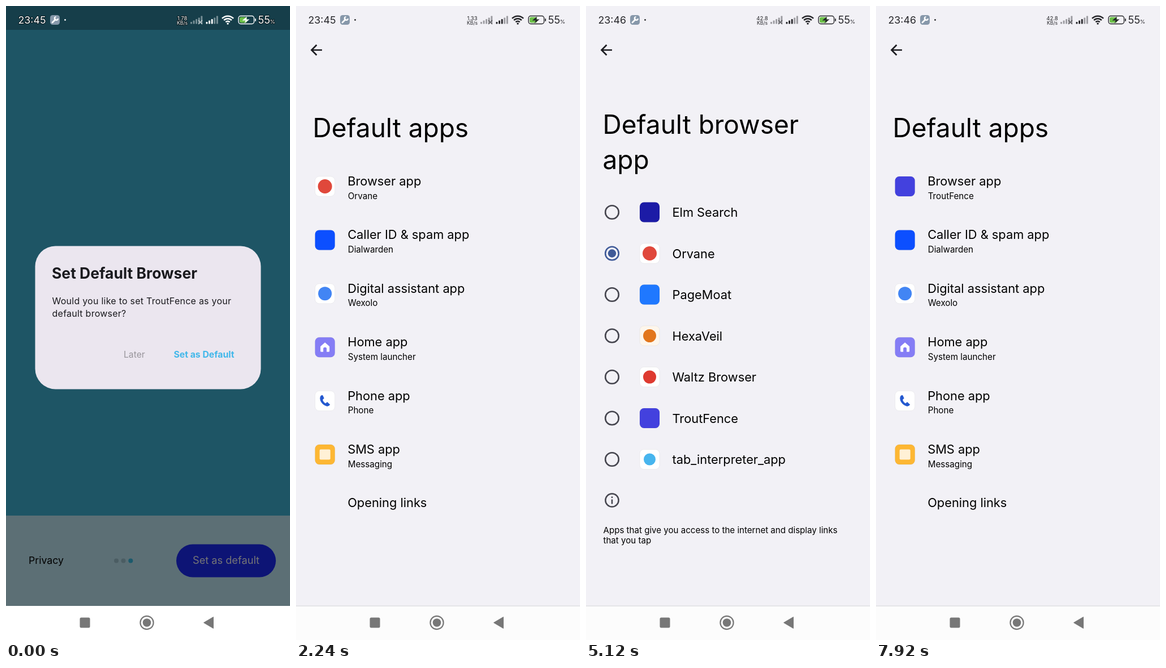
Write an HTML page that moves like this. It is 502 px wide and 1116 px high and loops after 8000 ms.

```html
<!DOCTYPE html>
<html lang="en">
<head>
<meta charset="utf-8">
<title>Default browser setup</title>
<style>
  html, body { margin: 0; width: 100%; height: 100%; overflow: hidden; background: #000; }
  svg { display: block; width: 100%; height: 100%; font-family: Inter, Roboto, sans-serif; font-optical-sizing: none; }
  text { white-space: pre; }
</style>
</head>
<body>
<svg id="stage" viewBox="0 0 502 1116"></svg>
<script>
const LOOP = 8000, W = 502, H = 1116;
const APP = 'TroutFence';
const PAPER = '#f2f1f6';

const txt = (x, y, size, str, attrs = '') =>
  `<text x="${x}" y="${y}" font-size="${size}" ${attrs}>${str}</text>`;
const rect = (x, y, w, h, fill, attrs = '') =>
  `<rect x="${x}" y="${y}" width="${w}" height="${h}" fill="${fill}" ${attrs}/>`;
const dot = (x, y, r, fill, attrs = '') =>
  `<circle cx="${x}" cy="${y}" r="${r}" fill="${fill}" ${attrs}/>`;

// App tile centred on x, y; inner is drawn around the tile's centre.
const tile = (x, y, fill, inner = '') =>
  `<g transform="translate(${x} ${y})">` +
  rect(-17.5, -17.5, 35, 35, fill, 'rx="7.5" stroke="#000" stroke-opacity=".05"') + inner + '</g>';

const house = '<path d="M0-8.5 8-1.5V6.5Q8 8 6.5 8H3V2.5Q3 0 0 0T-3 2.5V8H-6.5Q-8 8-8 6.5V-1.5Z" fill="#fff"/>';
const handset = '<path d="M-7-9.5Q-10-6-8 0-5 7 3 9.5 7 10 9 6.5L4 2 1 4.5Q-3 2-4-2L-1.5-4.5-4-10Z" fill="#2459cf"/>';
const icons = {
  chosen: ['#4341de'],
  ball: ['#fff', dot(0, 0, 12.5, '#e0483b')],
  caller: ['#0c4fff'],
  assist: ['#fff', dot(0, 0, 12, '#4285f4')],
  home: ['#857df5', house],
  phone: ['#fff', handset],
  sms: ['#fdb733', rect(-9.5, -9, 19, 18, '#fff', 'rx="2" opacity=".8"')],
  navy: ['#1c1ba6'],
  shield: ['#1f78ff'],
  wallet: ['#fdf6ec', dot(0, 0, 11.5, '#e2761b')],
  red: ['#fff', dot(0, 0, 11.5, '#de3a30')],
  sky: ['#fff', dot(0, 0, 10.5, '#47b5ee')]
};
const icon = (x, y, name) => tile(x, y, ...icons[name]);

const arrow = '<path d="M46 77.5H28M36.500 68.500 27.500 77.500 36.500 86.500" fill="none" stroke="#1c1c20" stroke-width="2.700"/>';

function setupPage() {
  return rect(0, 0, W, H, '#fff') +
    rect(0, 0, W, 1056, '#41b9de') +
    rect(0, 897, W, 159, '#c9f2ff') +
    txt(40, 982, 17.7, 'Privacy') +
    dot(195, 976.5, 4, '#a5cbd8') + dot(207.5, 976.5, 4, '#a5cbd8') + dot(220.3, 976.5, 4, '#3cc5ec') +
    rect(301, 947.5, 176, 58, '#1d2bff', 'rx="29"') +
    txt(389, 982, 18.2, 'Set as default', 'fill="#fff" text-anchor="middle"') +
    `<rect id="barrier" width="${W}" height="1056"/>` +
    rect(0, 0, W, 42, '#000', 'opacity=".27"') +
    '<g id="dialog">' +
    rect(51.5, 422.5, 399, 252, '#ebe6ef', 'rx="36"') +
    txt(81, 480, 26.5, 'Set Default Browser', 'font-weight="700" fill="#1a1a1e"') +
    '<g letter-spacing=".25" fill="#1a1a1e">' +
    txt(81.5, 525, 16, `Would you like to set ${APP} as your`) +
    txt(81.5, 547, 16, 'default browser?') + '</g>' +
    `<g clip-path="url(#pill)">` + rect(280, 588, 140, 51, '#3c488b', 'id="press" opacity="0"') +
    dot(350, 613, 0, '#3c488b', 'id="splash" opacity=".06"') + '</g>' +
    txt(208, 619, 15.7, 'Later', 'fill="#98959b"') +
    txt(350, 619, 15.8, 'Set as Default', 'font-weight="700" fill="#42b8ea" text-anchor="middle"') +
    '</g>';
}

const pageBase = () =>
  rect(0, 0, W, H, PAPER) + rect(0, 1056, W, 60, '#fcfcfc') + rect(0, 1055.5, W, 1.2, '#dadade') + arrow;

const appRows = [
  ['Browser app', 'Orvane', 'ball'],
  ['Caller ID &amp; spam app', 'Dialwarden', 'caller'],
  ['Digital assistant app', 'Wexolo', 'assist'],
  ['Home app', 'System launcher', 'home'],
  ['Phone app', 'Phone', 'phone'],
  ['SMS app', 'Messaging', 'sms'],
  ['Opening links']
];

function appsPage() {
  const rows = appRows.map(([name, sub, pic], i) => {
    const y = i * 94.4;
    const detail = (label, image) => txt(91.7, y + 339.5, 15.2, label) + icon(51.2, y + 317.5, image);
    let out = txt(91.2, y + 316, 21.8, name);
    if (i === 0) out += `<g id="before">${detail(sub, pic)}</g><g id="after">${detail(APP, 'chosen')}</g>`;
    else if (sub) out += detail(sub, pic);
    return out;
  }).join('');
  return pageBase() + txt(29.5, 230.5, 46, 'Default apps') +
    `<g clip-path="url(#rowB)">${dot(267, 318, 0, 'url(#soft)', 'id="rippleB"')}</g>` +
    `<g id="listB">${rows}</g>`;
}

const browsers = [
  ['Elm Search', 'navy'], ['Orvane', 'ball'], ['PageMoat', 'shield'], ['HexaVeil', 'wallet'],
  ['Waltz Browser', 'red'], [APP, 'chosen'], ['tab_interpreter_app', 'sky']
];
const OLD = 1, NEW = 5;

function browserPage() {
  const rows = browsers.map(([name, pic], i) => {
    const y = 363 + i * 72.5;
    return `<circle id="ring${i}" cx="46" cy="${y}" r="11.800" fill="none" stroke-width="2.600"/>` +
      dot(46, y, 0, '#3f5a98', `id="core${i}"`) +
      icon(112.5, y, pic) + txt(152.5, y + 8, 21.8, name);
  }).join('');
  const info = '<g stroke="#46464f" stroke-width="2.500" fill="none">' +
    '<circle cx="46" cy="870" r="11.600"/><path d="M46 868.500V876.500M46 863.500V866"/></g>';
  return pageBase() + txt(29.5, 225, 46, 'Default browser') + txt(29.5, 287, 46, 'app') +
    `<g clip-path="url(#rowC)">${dot(250, 725.5, 0, 'url(#soft)', 'id="rippleC"')}</g>` +
    `<g id="listC">${rows}${info}` +
    txt(30.5, 927.7, 15.1, 'Apps that give you access to the internet and display links') +
    txt(30.5, 946.3, 15.1, 'that you tap') + '</g>';
}

function statusBar() {
  const bars = (x, solid) => [3.5, 6, 8.5, 11, 14].map((h, i) =>
    rect(x + i * 4.6, 31.5 - h, 2.9, h, 'currentColor', `rx=".8" opacity="${i < solid ? 1 : .42}"`)).join('');
  const arc = r => {
    const d = r * .72;
    return `<path d="M${392 - d} ${32 - d}A${r} ${r} 0 0 1 ${392 + d} ${32 - d}"/>`;
  };
  return '<g id="status">' +
    '<g fill="currentColor" id="labels" paint-order="stroke" stroke-linejoin="round">' +
    txt(21.5, 31, 17.8, '', 'id="clock"') +
    txt(311.5, 24.5, 9.5, '', 'id="rate" text-anchor="middle"') +
    txt(311.5, 33, 8.6, 'KB/s', 'text-anchor="middle"') +
    txt(445.5, 31, 18, '55') + txt(466.5, 31, 9.5, '%') + '</g>' +
    rect(78, 16, 17, 17, '#8798aa', 'rx="4.500"') +
    '<path d="M82 29 87.500 23.500" stroke="#fff" stroke-width="2.800" stroke-linecap="round"/>' +
    '<path d="M91.800 22A3 3 0 1 1 88.500 19" fill="none" stroke="#fff" stroke-width="2.200"/>' +
    dot(104.5, 24.5, 1.4, 'currentColor') +
    bars(326, 0) + '<path d="M340 25 347 32M347 25 340 32" stroke="currentColor" stroke-width="1.300" opacity=".65"/>' +
    bars(353.5, 3) +
    `<g fill="none" stroke="currentColor" stroke-width="2.500">${[5, 9.5, 14].map(arc).join('')}</g>` +
    dot(392, 31, 1.7, 'currentColor') +
    rect(411, 17.5, 27.5, 14, 'none', 'rx="4" stroke="currentColor" stroke-width="1.400"') +
    rect(440, 22, 1.8, 5, 'currentColor', 'rx=".9"') +
    rect(413, 19.5, 13, 10, '#6cc048', 'rx="2.500"') +
    '<path d="M426 18.500 417.500 25.500H423.500L421.500 30.500 430.500 23.500H424.500Z" fill="currentColor"/>' +
    '</g>';
}

const navBar = rect(130.5, 1076.5, 18, 18, '#777', 'rx="2.500"') +
  dot(249, 1085.5, 11.6, 'none', 'stroke="#777" stroke-width="2.200"') + dot(249, 1085.5, 7.3, '#777') +
  '<path d="M349.500 1085.500 366.500 1075.500V1095.500Z" fill="#777" stroke="#777" stroke-linejoin="round"/>';

const clip = (id, x, y, w, h, rx = 0) =>
  `<clipPath id="${id}">${rect(x, y, w, h, '#000', `id="${id}Box" rx="${rx}"`)}</clipPath>`;
const page = (id, body) =>
  `<g id="page${id}"><g clip-path="url(#card${id})">${body}` +
  rect(0, 0, W, H, '#000', `id="dim${id}" opacity="0"`) + '</g></g>';

document.getElementById('stage').innerHTML =
  '<defs>' + clip('cardA', 0, 0, W, H) + clip('cardB', 0, 0, W, H) + clip('cardC', 0, 0, W, H) +
  clip('pill', 280, 588, 140, 51, 25.5) + clip('rowB', 0, 271, W, 94) + clip('rowC', 0, 689.5, W, 72.5) +
  '<radialGradient id="soft"><stop offset=".52" stop-opacity=".27"/><stop offset="1" stop-opacity="0"/></radialGradient></defs>' +
  page('A', setupPage()) + page('B', appsPage()) + page('C', browserPage()) + statusBar() + navBar;

const el = {};
document.querySelectorAll('[id]').forEach(n => { el[n.id] = n; });
const set = (id, name, value) => el[id].setAttribute(name, value);
const show = (id, on) => set(id, 'display', on ? 'inline' : 'none');

const ramp = (t, from, to) => Math.min(1, Math.max(0, (t - from) / (to - from)));
const easeOut = p => 1 - (1 - p) * (1 - p);
// Critically damped spring from 0 to 1.
const spring = (t, start) => {
  const k = Math.max(0, t - start) * .017;
  return 1 - (1 + k) * Math.exp(-k);
};

function placePage(id, x, dim, visible) {
  show('page' + id, visible);
  set('page' + id, 'transform', `translate(${x.toFixed(2)} 0)`);
  set('dim' + id, 'opacity', (dim * .17).toFixed(3));
  set('card' + id + 'Box', 'rx', Math.abs(x) > .6 ? 42 : 0);
}

function update(t) {
  const inB = spring(t, 1000);
  const inC = t < 7240 ? spring(t, 3420) : 1 - spring(t, 7240);
  const xB = W * (1 - inB) - 125 * inC;
  placePage('A', -125 * inB, inB, t < 2000);
  placePage('B', xB, inC, t > 1000);
  placePage('C', W * (1 - inC), 0, inC > .0012);

  const leave = ramp(t, 880, 960);
  set('dialog', 'opacity', 1 - .25 * leave);
  set('barrier', 'opacity', .54 - .064 * leave);
  set('press', 'opacity', .06 * ramp(t, 160, 360));
  set('splash', 'r', t < 160 ? 0 : 15 + 65 * easeOut(ramp(t, 160, 760)));

  const growB = easeOut(ramp(t, 3100, 3420));
  set('rippleB', 'r', t < 3100 ? 0 : 50 + 183 * growB);
  set('rippleB', 'opacity', 1 - ramp(t, 3440, 3900));
  const growC = easeOut(ramp(t, 5340, 5800));
  set('rippleC', 'r', t < 5340 ? 0 : 50 + 350 * growC);
  set('rippleC', 'opacity', 1 - ramp(t, 5700, 6200));

  show('listB', t >= 1560);
  show('listC', t >= 3800);
  show('before', t < 7600);
  show('after', t >= 7600);

  const swap = ramp(t, 5520, 5680);
  browsers.forEach((_, i) => {
    const on = i === OLD ? 1 - swap : i === NEW ? swap : 0;
    set('core' + i, 'r', 7.2 * on);
    set('ring' + i, 'stroke', on > .5 ? '#3f5a98' : '#46464f');
  });

  const light = t < 1120;
  set('status', 'color', light ? '#fff' : '#26262a');
  set('labels', 'stroke', light ? '#07171c' : 'none');
  set('labels', 'stroke-width', 2);
  el.clock.textContent = t < 2560 ? '23:45' : '23:46';
  el.rate.textContent = t < 560 ? '1.78' : t < 4080 ? '1.33' : '42.8';
}

const begin = performance.now();
function tick() {
  update((performance.now() - begin) % LOOP);
  requestAnimationFrame(tick);
}
tick();
</script>
</body>
</html>
```
